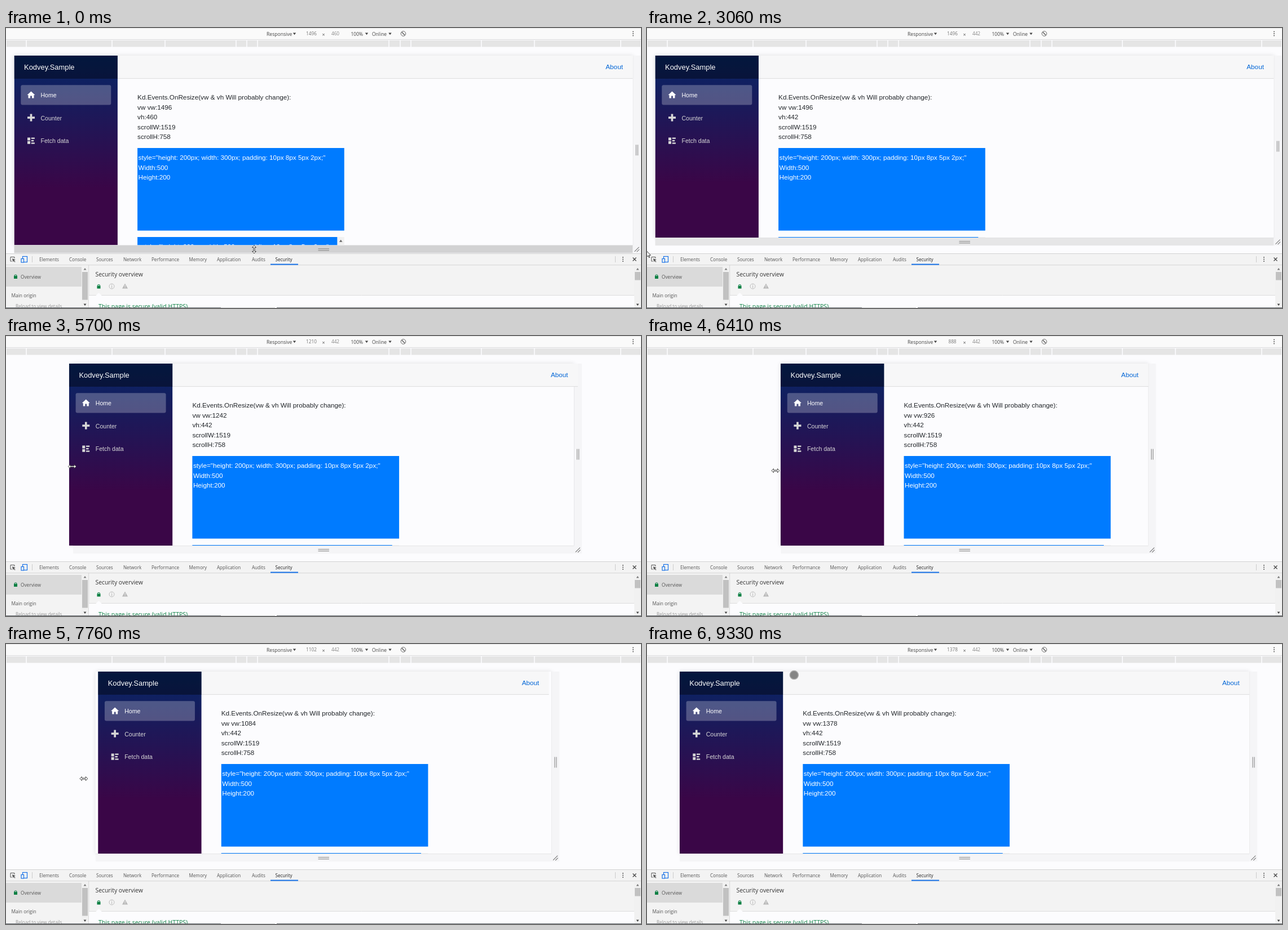
An HTML page with a canvas that plays this animation: 1126 px wide and 497 px high, repeating every 9400 ms.

```html
<!DOCTYPE html>
<html lang="en">
<head>
<meta charset="utf-8">
<title>Responsive resize</title>
<style>
html, body { margin: 0; width: 100%; height: 100%; overflow: hidden; background: #fcfcfe; }
canvas { display: block; }
</style>
</head>
<body>
<canvas id="stage" width="1126" height="497"></canvas>
<script>
const ctx = document.getElementById('stage').getContext('2d');
const LOOP = 9400, STEP = LOOP / 132, SCALE = 0.7333, TOP = 48, MID = 563;
const PAGE = '"Liberation Sans", Arial, sans-serif';
const TOOL = '"Open Sans", "Noto Sans", sans-serif';

// Keys are [time, value, ...].
const heights = [[0, 460], [210, 458], [430, 456], [900, 368], [1300, 284], [1430, 282],
  [1569, 294], [1640, 300], [2000, 380], [2350, 442]];
const widths = [[4500, 1496], [4919, 1494], [4990, 1476], [5340, 1369], [6339, 926], [6365, 888],
  [6410, 888], [6550, 884], [6800, 894], [7340, 985], [7689, 1084], [7715, 1090], [7760, 1102],
  [8330, 1227], [8850, 1378]];
const pointer = [[0, 440, 393], [430, 440, 389], [900, 446, 322], [1350, 451, 268], [1640, 453, 287],
  [2000, 455, 344], [2350, 455, 380], [2450, 452, 381], [3060, 0, 396], [3150, -14, 400],
  [3900, -14, 300], [4420, 6, 224], [4700, 7, 224], [4990, 15, 224], [5340, 62, 228], [6410, 228, 239],
  [6550, 227, 239], [7340, 174, 240], [7760, 138, 239], [8330, 93, 237], [8850, 50, 232],
  [8950, 50, 230], [9330, 261.5, 54.5]];

function sample(keys, t, i = 1) {
  if (t <= keys[0][0]) return keys[0][i];
  for (let k = 1; k < keys.length; k++) {
    const a = keys[k - 1], b = keys[k];
    if (t <= b[0]) return a[i] + (b[i] - a[i]) * (t - a[0]) / (b[0] - a[0]);
  }
  return keys[keys.length - 1][i];
}
const even = v => Math.round(v / 2) * 2;

function rect(x, y, w, h, color) {
  ctx.fillStyle = color;
  ctx.fillRect(x, y, w, h);
}
function text(str, x, cy, size, color, family = TOOL, align = 'left') {
  ctx.font = `${size}px ${family}`;
  ctx.fillStyle = color;
  ctx.textAlign = align;
  ctx.fillText(str, x, cy + size * 0.36);
}
function poly(points, fill, stroke, width = 1) {
  ctx.beginPath();
  points.forEach(([x, y]) => ctx.lineTo(x, y));
  if (fill) { ctx.closePath(); ctx.fillStyle = fill; ctx.fill(); }
  if (stroke) { ctx.strokeStyle = stroke; ctx.lineWidth = width; ctx.stroke(); }
}
const line = (x1, y1, x2, y2, color, width) => poly([[x1, y1], [x2, y2]], null, color, width);
const triangle = (x, y, r, color, dir = 1) =>
  poly([[x - r, y - r * 0.6 * dir], [x + r, y - r * 0.6 * dir], [x, y + r * 0.8 * dir]], color);
function circle(x, y, r, fill, stroke, width = 1) {
  ctx.beginPath();
  ctx.arc(x, y, r, 0, Math.PI * 2);
  if (fill) { ctx.fillStyle = fill; ctx.fill(); }
  if (stroke) { ctx.strokeStyle = stroke; ctx.lineWidth = width; ctx.stroke(); }
}
function dots(x, y) {
  for (const d of [-3.5, 0, 3.5]) circle(x, y + d, 1, '#555');
}
function lock(x, y) {
  rect(x - 3, y - 1.5, 6, 5, '#0b8043');
  ctx.beginPath();
  ctx.arc(x, y - 1.5, 2, Math.PI, 0);
  ctx.strokeStyle = '#0b8043';
  ctx.lineWidth = 1.1;
  ctx.stroke();
}

function drawToolbar(w, h) {
  rect(0, 0, 1126, 20, '#fafafa');
  rect(0, 0, 1126, 1, '#e4e4e4');
  rect(0, 20, 1126, 1, '#d9d9db');
  rect(1, 22, 1124, 11.5, '#e5e5e5');
  for (const x of [36, 188, 282, 408, 427, 446, 679, 699, 718, 843, 937, 1090])
    rect(x - 0.8, 22, 1.6, 12, '#fcfcfe');
  text('Responsive', 462, 10.5, 8.6, '#444');
  text('100%', 611.5, 10.5, 8.5, '#444');
  text('Online', 649, 10.5, 8.5, '#444');
  for (const x of [511.5, 639.5, 681]) triangle(x, 10, 2.7, '#444');
  text(even(w), 541.5, 10.5, 8.3, '#777', TOOL, 'center');
  text('×', 563, 11.5, 9, '#555', TOOL, 'center');
  text(even(h), 584, 10.5, 8.3, '#888', TOOL, 'center');
  circle(704.5, 10, 4.3, null, '#666');
  line(701.5, 7, 707.5, 13, '#666', 1.6);
  dots(1112, 10);
}

function drawIcons(x) {
  poly([[x + 23, 119], [x + 30, 112.5], [x + 37, 119], [x + 35, 119], [x + 35, 124.5],
    [x + 31.5, 124.5], [x + 31.5, 120.5], [x + 28.5, 120.5], [x + 28.5, 124.5],
    [x + 25, 124.5], [x + 25, 119]], '#fff');
  rect(x + 23.5, 157.3, 13, 3.6, '#d7d7d7');
  rect(x + 28.2, 152.6, 3.6, 13, '#d7d7d7');
  for (let i = 0; i < 3; i++) {
    if (i < 2) rect(x + 23.5, 194.5 + i * 6.3, 5, 5, '#d7d7d7');
    rect(x + 30.2, 194.5 + i * 4.4, i === 1 ? 4.6 : 6.2, 2.4, '#d7d7d7');
  }
}

function drawPage(w, h, vw, vh) {
  const x = MID - w * SCALE / 2, right = MID + w * SCALE / 2;
  const bottom = TOP + h * SCALE;
  ctx.save();
  ctx.beginPath();
  ctx.rect(x, 49, right - x, bottom - 49);
  ctx.clip();

  rect(x, 49, right - x, 40.5, '#f7f7f8');
  rect(x, 89.2, right - x, 0.9, '#d9d9da');
  const shade = ctx.createLinearGradient(0, TOP, 0, bottom);
  shade.addColorStop(0, '#052767');
  shade.addColorStop(0.7, '#3a0647');
  rect(x, 49, 183.4, bottom - 49, shade);
  rect(x, 49, 183.4, 41, 'rgba(0,0,0,.4)');
  text('Kodvey.Sample', x + 17.6, 69.3, 12.9, '#fff', PAGE);
  text('About', right - 17.6, 68.6, 11.73, '#0366d6', PAGE, 'right');

  ctx.beginPath();
  ctx.roundRect(x + 11.8, 101.3, 160, 35.2, 3);
  ctx.fillStyle = 'rgba(255,255,255,.25)';
  ctx.fill();
  drawIcons(x);
  text('Home', x + 47, 118.8, 10.56, '#fff', PAGE);
  text('Counter', x + 47, 159.8, 10.56, '#d7d7d7', PAGE);
  text('Fetch data', x + 47, 200.4, 10.56, '#d7d7d7', PAGE);

  const left = x + 218.6;
  const lines = ['Kd.Events.OnResize(vw & vh Will probably change):', 'vw vw:' + even(vw),
    'vh:' + even(vh), 'scrollW:1519', 'scrollH:758'];
  lines.forEach((s, i) => text(s, left, 123 + i * 17.55, 11.73, '#212529', PAGE));

  rect(left, 213, 366.7, 146.6, '#007bff');
  ['style="height: 200px; width: 300px; padding: 10px 8px 5px 2px;"', 'Width:500', 'Height:200']
    .forEach((s, i) => text(s, left + 1.5, 229.8 + i * 17.6, 11.73, '#fff', PAGE));
  rect(left, 371, 354.5, 146, '#007bff');
  rect(left + 354.5, 371, 12.2, 146, '#f1f1f1');
  triangle(left + 360.6, 378, 2.8, '#666', -1);
  text('style="height: 200px; width: 500px; padding: 10px 8px 5px 2px;"', left + 7.3, 387.8, 11.73, '#fff', PAGE);
  ctx.restore();
}

function drawDevice(t, w, h) {
  const x = MID - w * SCALE / 2, right = MID + w * SCALE / 2;
  const bottom = TOP + h * SCALE, cy = (TOP + bottom) / 2;
  let bar = '#f5f5f7';
  if (t < 430) bar = '#d2d2d3';
  else if (t > 2350 && t < 3200) bar = '#e6e6e7';

  ctx.save();
  ctx.shadowColor = 'rgba(0,0,0,.12)';
  ctx.shadowBlur = 8;
  rect(x, 49, right - x, bottom - 49, '#fcfcfe');
  ctx.restore();
  rect(x, bottom, right - x, 14, bar);
  rect(right, 49, 14, bottom - 35, '#f5f5f7');
  rect(x, bottom, right - x, 0.8, '#dcdcde');
  rect(right, 49, 0.8, bottom - 49, '#e2e2e4');
  rect(x, 49, right - x, bottom - 49, '#fcfcfe');

  for (const d of [6.5, 9.5]) {
    line(553.5, bottom + d, 573, bottom + d, '#888', 1.1);
    line(right + d - 0.7, cy - 9.5, right + d - 0.7, cy + 9.5, '#888', 1.1);
  }
  line(right + 3, bottom + 11.5, right + 11, bottom + 3.5, '#777', 1.1);
  line(right + 7, bottom + 12, right + 11.5, bottom + 7.5, '#777', 1.1);
  if (t > 4420 && t < 5100) {
    rect(x - 14, 49, 14, bottom - 49, '#e5e5e6');
    for (const d of [8.7, 5.7]) line(x - d, cy - 9.5, x - d, cy + 9.5, '#888', 1.1);
  }
}

function scrollbar(x, thumb) {
  rect(x, 421, 12, 76, '#f1f1f1');
  rect(x + 1, 433, 10, thumb, '#c1c1c1');
  triangle(x + 6, 428, 2.4, '#777', -1);
  triangle(x + 6, 491, 2.4, '#444');
}

function drawTools() {
  rect(0, 400, 1126, 97, '#f3f3f3');
  rect(0, 400, 1126, 0.9, '#cfcfcf');
  rect(0, 420.3, 1126, 0.9, '#d0d0d0');

  poly([[15, 409], [15, 406.5], [8, 406.5], [8, 414], [10.5, 414]], null, '#555');
  poly([[11, 409], [17, 411.5], [14.3, 412.3], [16.5, 415], [15.5, 415.8], [13.5, 413.2], [12.4, 415.5]], '#555');
  ctx.strokeStyle = '#1a73e8';
  ctx.lineWidth = 1.2;
  ctx.strokeRect(29.5, 405.5, 8, 10);
  rect(26.5, 409, 5.5, 7.5, '#f3f3f3');
  ctx.strokeRect(27, 409.5, 4.5, 6.5);
  line(46.5, 405, 46.5, 416, '#ccc');
  const tabs = { Elements: 59, Console: 112, Sources: 160, Network: 208, Performance: 258, Memory: 324.5,
    Application: 374, Audits: 436, Security: 477.5 };
  for (const name in tabs) text(name, tabs[name], 410.8, 8.1, name === 'Security' ? '#222' : '#555');
  rect(469, 418.6, 49, 2, '#1a73e8');
  line(1080.5, 405, 1080.5, 416, '#ccc');
  dots(1094, 410.5);
  line(1111.5, 407.5, 1117.5, 413.5, '#444', 1.3);
  line(1117.5, 407.5, 1111.5, 413.5, '#444', 1.3);

  rect(0, 424, 134, 35, '#dadada');
  lock(17, 441.5);
  text('Overview', 26, 441.8, 8.3, '#555');
  text('Main origin', 9.5, 475.3, 8.4, '#555');
  text('Reload to view details', 17, 494, 8.2, '#999');
  scrollbar(134, 49.5);
  rect(146.3, 421, 0.8, 76, '#d0d0d0');

  text('Security overview', 158.5, 437, 10.4, '#333');
  lock(164.5, 459);
  circle(187.5, 458.5, 4.5, null, '#bbb');
  rect(187, 457.5, 1.1, 4, '#bbb');
  rect(187, 455.5, 1.1, 1.2, '#bbb');
  poly([[206, 462.5], [211, 453.5], [216, 462.5]], '#b8b8b8');
  rect(210.5, 456.5, 1.1, 3, '#f3f3f3');
  rect(210.5, 460.3, 1.1, 1.1, '#f3f3f3');
  rect(147, 474.5, 967, 22.5, '#fcfcfe');
  line(147, 474.5, 1114, 474.5, '#d9d9d9', 0.8);
  poly([[159, 475.2], [164.5, 470], [170, 475.2]], '#fcfcfe');
  text('This page is secure (valid HTTPS)', 164, 494, 10.5, '#0b8043');
  scrollbar(1114, 14.5);
  rect(0, 496, 1126, 1, '#666b70');
  rect(381, 496, 99, 1, '#c8cacc');
  rect(477, 495.5, 3, 1.5, '#fff');
}

function drawPointer(t) {
  const x = sample(pointer, t), y = sample(pointer, t, 2);
  if (t > 9020) {
    circle(x, y, 7.5, '#858585', '#a9a9a9', 1.5);
    return;
  }
  ctx.save();
  ctx.translate(x, y);
  ctx.lineJoin = 'round';
  const sideways = t > 4415 && t < 8920;
  if (t < 2400 || sideways) {
    if (!sideways) ctx.rotate(Math.PI / 2);
    poly([[-7, 0], [-3.5, -3.5], [-3.5, -1], [3.5, -1], [3.5, -3.5], [7, 0], [3.5, 3.5], [3.5, 1],
      [-3.5, 1], [-3.5, 3.5], [-7, 0]], '#fff', '#333', 0.9);
  } else {
    poly([[0, 0], [0, 10], [2.3, 8], [4, 11.5], [5.3, 10.8], [3.8, 7.5], [6.8, 7.2], [0, 0]], '#fff', '#222', 0.9);
  }
  ctx.restore();
}

function draw(now) {
  const t = Math.floor((now % LOOP + 5) / STEP) % 132 * STEP;
  const w = sample(widths, t), h = sample(heights, t);
  // Page layout trails the frame slightly; its readout trails by a full step.
  const layout = t - 45, readout = t - STEP;
  rect(0, 0, 1126, 497, '#fcfcfe');
  drawToolbar(w, h);
  drawDevice(t, w, h);
  drawPage(sample(widths, layout), Math.min(h, sample(heights, layout)),
    sample(widths, readout), sample(heights, readout));
  drawTools();
  drawPointer(t);
}

let start;
function tick(now) {
  start ??= now;
  draw(Math.max(0, now - start));
  requestAnimationFrame(tick);
}
draw(0);
requestAnimationFrame(tick);
</script>
</body>
</html>
```
